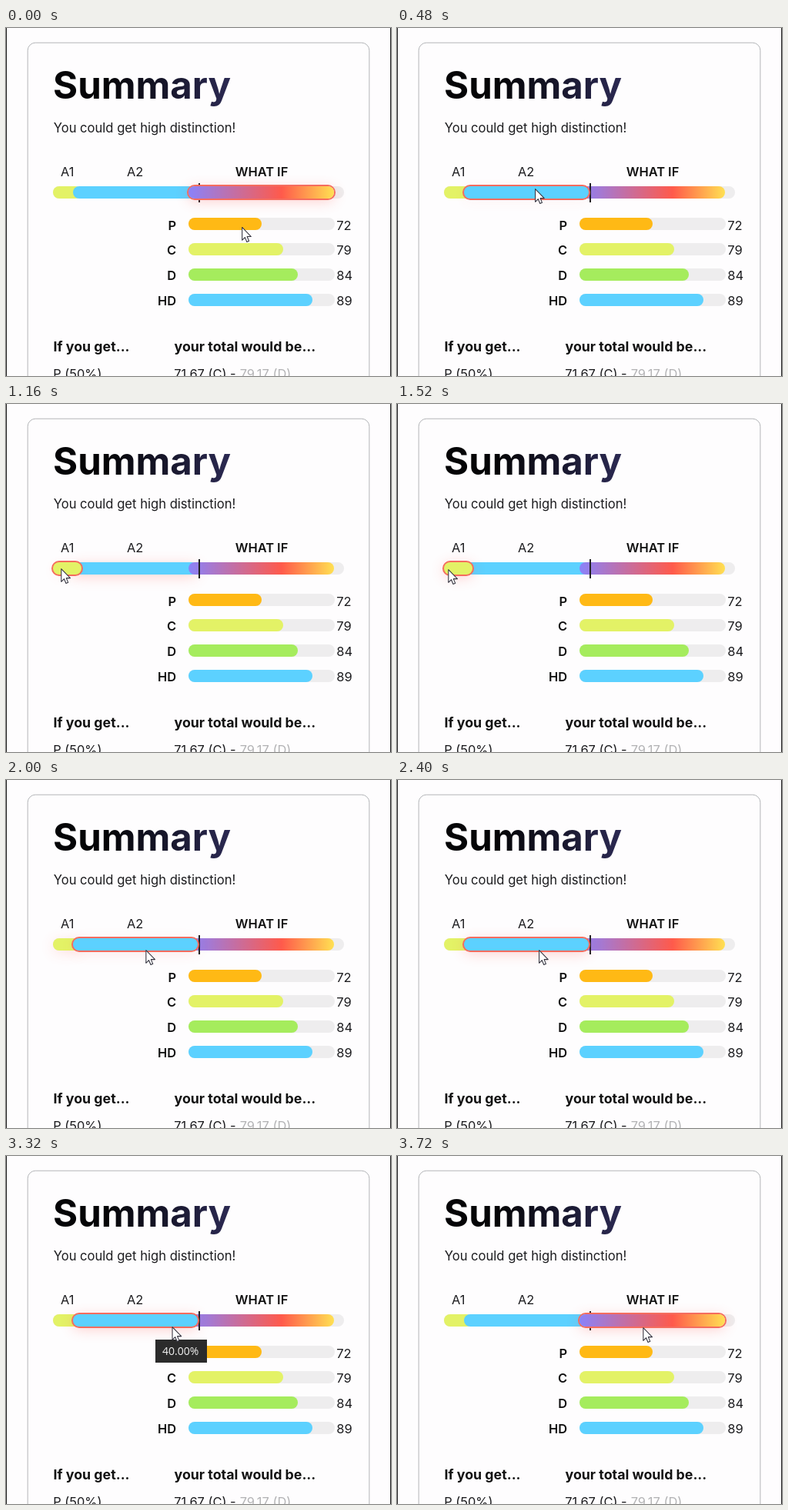
An HTML page for the animation above (3760 ms loop, 500 px wide and 453 px high).

```html
<!DOCTYPE html>
<html lang="en">
<head>
<meta charset="utf-8">
<title>Summary</title>
<style>
  html, body { margin: 0; width: 100%; height: 100%; overflow: hidden; background: #fefdfe; }
  #stage { position: relative; width: 500px; height: 453px; overflow: hidden; }
  #stage > * { position: absolute; }
  svg { left: 0; top: 0; display: block; }
  text { font: 400 16.4px Inter, sans-serif; fill: #1c1c1f; }
  .lead { font-size: 16.6px; }
  .bold { font-weight: 600; fill: #111; }
  .head { font-weight: 700; font-size: 17.8px; fill: #111; }
  .title { font-weight: 700; font-size: 49.1px; fill: url(#ink); }
  .faint { fill: #b4b4b6; }
  .bar { height: 16px; border-radius: 8px; }
  #mark { left: 250px; top: 201.5px; width: 2.3px; height: 25px; background: #222226; z-index: 1; }
  #tip {
    left: 193.6px; top: 238.6px; width: 67.6px; height: 30.4px; z-index: 3;
    background: #2b2b2b; color: #f2f2f2; text-indent: -1.5px;
    font: 14px/29px "Open Sans", sans-serif; text-align: center;
  }
  #cursor { z-index: 4; overflow: visible; }
</style>
</head>
<body>
<div id="stage">
  <svg id="page" width="500" height="453">
    <defs>
      <linearGradient id="ink" gradientUnits="userSpaceOnUse" x1="62" x2="291" y1="0" y2="0">
        <stop offset=".3" stop-color="#050507"/>
        <stop offset="1" stop-color="#2b2952"/>
      </linearGradient>
    </defs>
    <rect x="28.2" y="19.2" width="443.600" height="460" rx="10" fill="#fefdfe" stroke="#b4b6b9"/>
    <path d="M.5 0V453M499.5 0V453" stroke="#1a1a1a"/>
    <text class="title" x="61" y="92.200">Summary</text>
    <text class="lead" x="61.700" y="136">You could get high distinction!</text>
    <text x="71" y="192.500">A1</text>
    <text x="157" y="192.500">A2</text>
    <text class="bold" x="332" y="192.500" text-anchor="middle">WHAT IF</text>
    <text class="head" x="61.500" y="421">If you get...</text>
    <text class="head" x="218.500" y="421">your total would be...</text>
    <text x="61.200" y="456.300">P (50%)</text>
    <text x="218.200" y="456.300">71.67 (C) -</text>
    <text class="faint" x="303.700" y="456.300">79.17 (D)</text>
  </svg>
  <div id="mark"></div>
  <div id="tip">40.00%</div>
  <svg id="cursor" width="14" height="20">
    <path transform="translate(-.7) scale(1.06)"
      d="M.5 .5V16.300L4 12.900 6.300 18.400 8.900 17.300 6.600 11.900H11.500Z"
      fill="#fff" stroke="#33333f" stroke-linejoin="round"/>
  </svg>
</div>
<script>
const LOOP = 3760, FADE = 300;
const LIME = '#e3f266', SKY = '#5cd1ff', TRACK = '#eeedee';
const stage = document.getElementById('stage');
const page = document.getElementById('page');
const tip = document.getElementById('tip');
const cursor = document.getElementById('cursor');

function bar(x, end, y, fill) {
  const el = document.createElement('div');
  el.className = 'bar';
  Object.assign(el.style, { left: x + 'px', top: y + 'px', width: end - x + 'px', background: fill });
  stage.insertBefore(el, document.getElementById('mark'));
  return el;
}

function label(str, x, y, bold) {
  const el = document.createElementNS('http://www.w3.org/2000/svg', 'text');
  el.setAttribute('x', x);
  el.setAttribute('y', y);
  if (bold) {
    el.setAttribute('class', 'bold');
    el.setAttribute('text-anchor', 'end');
  }
  el.textContent = str;
  page.append(el);
}

[['P', 72, 332, '#ffb915'], ['C', 79, 360, LIME], ['D', 84, 379, '#a5ec5d'], ['HD', 89, 397.5, SKY]]
  .forEach(([grade, score, end, fill], i) => {
    const y = 247.4 + i * 32.75;
    bar(237, 426.5, y, TRACK);
    bar(237, end, y, fill);
    label(grade, 221, y + 15.2, true);
    label(score, 429.3, y + 15.2);
  });

bar(61, 439, 206, TRACK);
const parts = [
  bar(61, 98, 206, LIME),
  bar(87, 249, 206, SKY),
  bar(237, 426, 206, 'linear-gradient(90deg, #8a82fa, #ff5a4b 64%, #ffe052)')
];

// Hover spans: part, from, to
const hovers = [[2, -500, 70], [1, 390, 1080], [0, 1080, 1860], [1, 1860, 3430], [2, 3430, 4200]];
const tipSpan = [3000, 3430];

// Pointer: time, x, y
const path = [
  [0, 307, 259], [200, 272, 243], [340, 222, 218], [480, 180, 209], [880, 103, 212],
  [1160, 72, 214], [1520, 67, 215], [1680, 71, 217], [1840, 112, 220], [2000, 182, 221],
  [2560, 185, 221], [3080, 185, 221], [3320, 216, 222], [3600, 316, 223], [3720, 320, 223], [LOOP, 320, 223]
];

const clamp = v => Math.max(0, Math.min(1, v));
const ease = v => v * v * (3 - 2 * v);

function slope(i, k) {
  const rate = j => (path[j + 1][k] - path[j][k]) / (path[j + 1][0] - path[j][0]);
  if (i === 0) return rate(0);
  if (i === path.length - 1) return 0;
  const a = rate(i - 1), b = rate(i);
  return a * b <= 0 ? 0 : 2 * a * b / (a + b);
}

// Monotone cubic through the pointer positions
function pointer(t, k) {
  let i = 0;
  while (i < path.length - 2 && t >= path[i + 1][0]) i++;
  const a = path[i], b = path[i + 1], d = b[0] - a[0], u = (t - a[0]) / d, s = ease(u);
  return a[k] * (1 - s) + b[k] * s
    + d * u * (1 - u) * ((1 - u) * slope(i, k) - u * slope(i + 1, k));
}

function draw(t) {
  parts.forEach((el, p) => {
    let on = false, glow = 0;
    for (const [part, from, to] of hovers) {
      if (part !== p) continue;
      if (t >= from && t < to) on = true;
      glow = Math.max(glow, ease(clamp((t - from) / FADE)) * (1 - ease(clamp((t - to) / FADE))));
    }
    el.style.zIndex = on ? 2 : 0;
    el.style.boxShadow = `0 0 0 2px ${on ? '#f56c5e' : 'transparent'}, 0 3px 17px rgba(255,90,80,${(glow * .31).toFixed(3)})`;
  });
  tip.style.visibility = t >= tipSpan[0] && t < tipSpan[1] ? 'visible' : 'hidden';
  cursor.style.transform = `translate(${pointer(t, 1)}px, ${pointer(t, 2)}px)`;
}

const start = performance.now();
function tick() {
  draw((performance.now() - start) % LOOP);
  requestAnimationFrame(tick);
}
tick();
</script>
</body>
</html>
```
